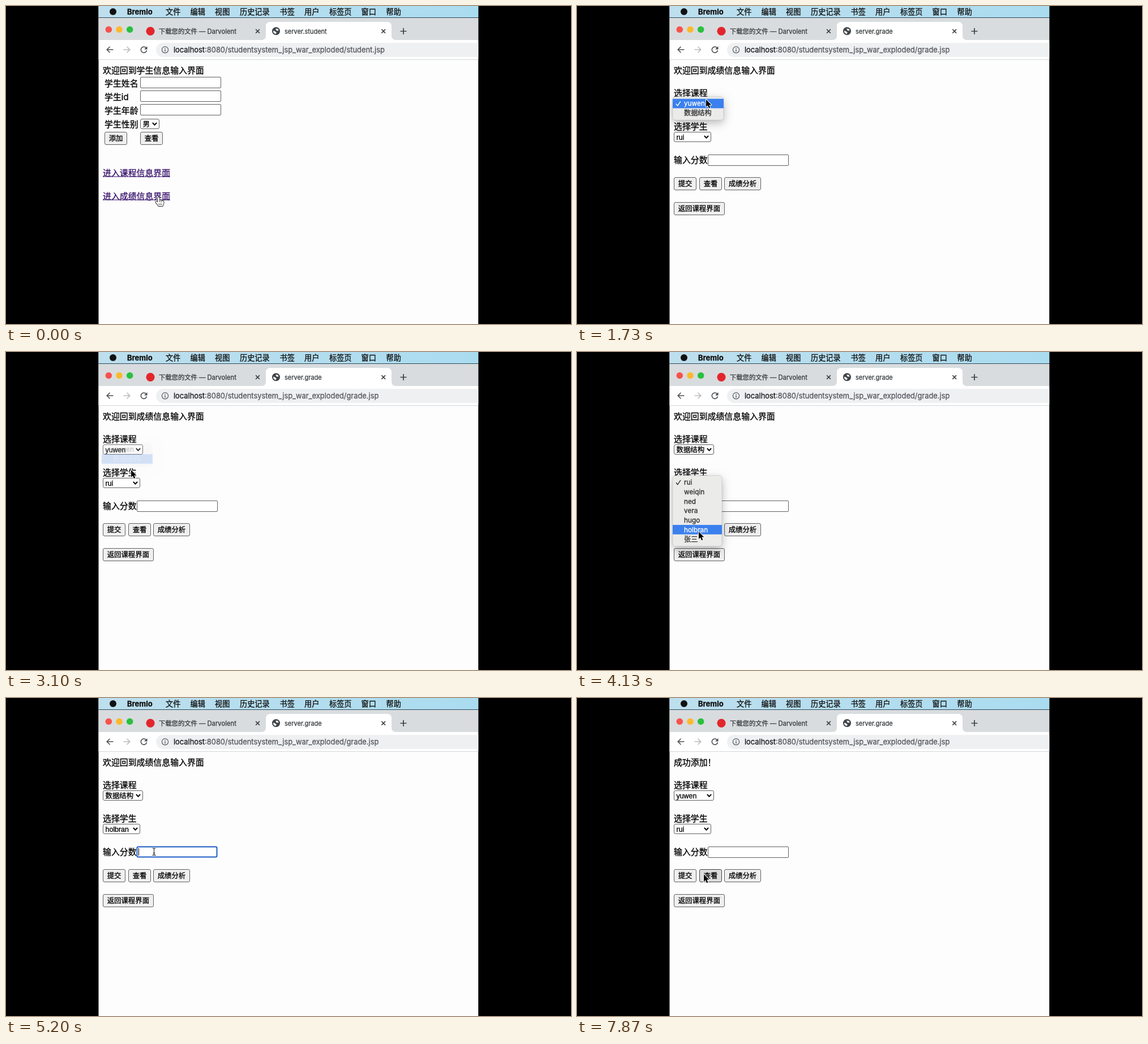
Animation of 998x561 px, one loop 8000 ms. Source, as an HTML page with a canvas:

```html
<!DOCTYPE html>
<html lang="zh-CN">
<head>
<meta charset="utf-8">
<style>
html, body { margin: 0; width: 100%; height: 100%; overflow: hidden; background: #000; }
canvas { display: block; }
</style>
</head>
<body>
<canvas id="stage" width="998" height="561"></canvas>
<script>
const ctx = document.getElementById('stage').getContext('2d');
const LOOP = 8000;
const LEFT = 163.5, RIGHT = 834.5, WIDTH = RIGHT - LEFT;
const UI = 'Inter, "Noto Sans CJK SC", sans-serif';
const CONTROL = '"Liberation Sans", "Noto Sans CJK SC", sans-serif';
const BORDER = '#606060';
const COURSES = ['yuwen', '数据结构'];
const STUDENTS = ['rui', 'weiqin', 'ned', 'vera', 'hugo', 'holbran', '张三'];
const ROW = 16.67;

const PAGE_LOADED = 620, SUBMITTED = 7250, FOCUSED = 5130, TYPED = 5630;
const courseMenu = { items: COURSES, x: 169, y: 160, w: 90, open: 1700, click: 2770, fade: 2940 };
const studentMenu = { items: STUDENTS, x: 169, y: 218, w: 87, open: 3600, click: 4400, fade: 4520 };
const FADE = 200;

// Pointer stops: time, x, y
const path = [
  [0, 269, 337], [700, 269, 337], [1600, 228, 165], [2500, 228, 165],
  [2640, 225, 184], [2800, 225, 184], [3100, 221, 208], [3350, 224, 226],
  [3600, 224, 226], [4130, 215, 317], [4400, 215, 317], [5000, 261, 271],
  [6130, 261, 271], [6170, 260, 306], [6370, 260, 306], [6600, 229, 307],
  [6700, 229, 307], [7000, 191, 309], [7250, 191, 309], [7750, 224, 311], [LOOP, 224, 311]
];

function pointerAt(t) {
  const i = path.findIndex(p => p[0] > t);
  const [t0, x0, y0] = path[i - 1], [t1, x1, y1] = path[i];
  const u = (t - t0) / (t1 - t0), k = u * u * (3 - 2 * u);
  return { x: x0 + (x1 - x0) * k, y: y0 + (y1 - y0) * k };
}

const inside = (p, x, y, w, h) => p.x >= x && p.x <= x + w && p.y >= y && p.y <= y + h;

// The hairline outline gives the slightly heavy look of smoothed screen text
function text(str, x, cy, size = 14.9, color = '#000', face = UI, weight = 400) {
  const y = cy + size * 0.37;
  ctx.font = `${weight} ${size}px ${face}`;
  ctx.fillStyle = ctx.strokeStyle = color;
  ctx.lineWidth = .3;
  ctx.fillText(str, x, y);
  ctx.strokeText(str, x, y);
}

function rect(x, y, w, h, color) {
  ctx.fillStyle = color;
  ctx.fillRect(x, y, w, h);
}

function box(x, y, w, h, radius, fill, stroke, line = 1) {
  ctx.beginPath();
  ctx.roundRect(x, y, w, h, radius);
  if (fill) { ctx.fillStyle = fill; ctx.fill(); }
  if (stroke) { ctx.strokeStyle = stroke; ctx.lineWidth = line; ctx.stroke(); }
}

function disc(x, y, r, color) {
  ctx.beginPath();
  ctx.arc(x, y, r, 0, 7);
  ctx.fillStyle = color;
  ctx.fill();
}

function stroke(d, color, width, x = 0, y = 0) {
  ctx.save();
  ctx.translate(x, y);
  ctx.strokeStyle = color;
  ctx.lineWidth = width;
  ctx.stroke(new Path2D(d));
  ctx.restore();
}

function shape(d, x, y, fill, line, width) {
  const p = new Path2D(d);
  ctx.save();
  ctx.translate(x, y);
  ctx.lineJoin = 'round';
  ctx.lineWidth = width;
  ctx.strokeStyle = line;
  ctx.stroke(p);
  ctx.fillStyle = fill;
  ctx.fill(p);
  ctx.restore();
}

function button(label, x, y, w, pointer) {
  const hover = inside(pointer, x, y, w, 23);
  box(x + .5, y + .5, w - 1, 22, 2.5, hover ? '#dcdcdc' : '#efefef', hover ? '#404040' : BORDER);
  text(label, x + 7.7, y + 11.5, 12.4, '#000', CONTROL);
}

function select(label, x, y, w) {
  box(x + .5, y + .5, w - 1, 17, 2.5, '#fff', BORDER);
  text(label, x + 4.5, y + 9.3, 12.4, '#000', CONTROL);
  stroke('M-3.6 -2L0 1.8L3.6 -2', '#000', 1.9, x + w - 8.5, y + 9);
}

function input(x, y, focused) {
  if (focused) box(x + .5, y + .5, 141, 18, 2, '#fff', '#1c5cc4', 2);
  else box(x + .5, y + .5, 142, 19, 1.5, '#fff', BORDER);
}

function link(label, y) {
  text(label, 171, y, 14.9, '#35106a');
  rect(171, y + 6.5, 119, 1, '#35106a');
}

function drawBrowser(page) {
  const sky = ctx.createLinearGradient(LEFT, 0, RIGHT, 0);
  sky.addColorStop(0, '#bddfee');
  sky.addColorStop(1, '#aadcf0');
  rect(LEFT, 0, WIDTH, 20, sky);
  rect(LEFT, 20, WIDTH, 1, '#2d4a5c');
  disc(189, 10, 6, '#111');
  text('Bremlo', 214, 10.5, 13, '#111', UI, 700);
  [['文件', 282], ['编辑', 325.5], ['视图', 369], ['历史记录', 413], ['书签', 483.5],
   ['用户', 527], ['标签页', 571], ['窗口', 627.5], ['帮助', 671.5]]
    .forEach(([s, x]) => text(s, x, 10.5, 13.2, '#111'));

  rect(LEFT, 21, WIDTH, 39, '#d8dcde');
  ['#f8524c', '#fbb92f', '#2bc03f'].forEach((c, i) => disc(181.3 + i * 18.7, 41.5, 5.8, c));
  disc(255, 44.3, 7.6, '#e2262c');
  text('下载您的文件 — Darvolent', 270, 44.5, 11.3, '#3c4043');

  ctx.fillStyle = '#fff';
  ctx.fill(new Path2D('M451 60Q459 60 459 52V36Q459 28 467 28H673Q681 28 681 36V52Q681 60 689 60Z'));
  disc(477, 44.3, 7, '#3f4448');
  ctx.fillStyle = '#fff';
  ctx.fill(new Path2D('M472 43.5L475 44.5L478 47L476 49.5L472.5 47ZM476 40L480.5 40.5L481.5 43.5L478 43.5Z'));
  text('server.' + page, 492, 44.5, 11, '#3c4043');
  const cross = 'M-3.4 -3.4L3.4 3.4M3.4 -3.4L-3.4 3.4';
  stroke(cross, '#3c4043', 1.5, 444.5, 44.5);
  stroke(cross, '#3c4043', 1.5, 666.7, 44.5);
  stroke('M-5.5 0H5.5M0 -5.5V5.5', '#3c4043', 1.7, 702, 44.5);

  rect(LEFT, 60, WIDTH, 34, '#fff');
  rect(LEFT, 94, WIDTH, 1, '#d4d6d8');
  stroke('M6 0H-5M0 -5.3L-5.3 0L0 5.3', '#4a4e52', 1.6, 183.5, 77);
  stroke('M-6 0H5M0 -5.3L5.3 0L0 5.3', '#b8bbbe', 1.6, 213.5, 77);
  stroke('M4 -3.2A5.2 5.2 0 1 0 5.1 1.2', '#4a4e52', 1.6, 243.5, 77);
  ctx.fillStyle = '#4a4e52';
  ctx.fill(new Path2D('M249.5 71V76.5H244Z'));
  box(265, 65, 600, 25, 12.5, '#eef0f2');
  ctx.beginPath();
  ctx.arc(281, 77.3, 5.6, 0, 7);
  ctx.strokeStyle = '#54585c';
  ctx.lineWidth = 1.2;
  ctx.stroke();
  rect(280.3, 76.5, 1.4, 4, '#54585c');
  rect(280.3, 74, 1.4, 1.4, '#54585c');
  text('localhost', 296, 77, 12.9, '#202124');
  const hostWidth = ctx.measureText('localhost').width;
  text(`:8080/studentsystem_jsp_war_exploded/${page}.jsp`, 296 + hostWidth, 77, 12.9, '#565a5f');
}

function drawStudentPage(pointer) {
  text('欢迎回到学生信息输入界面', 171, 113);
  ['学生姓名', '学生id', '学生年龄', '学生性别'].forEach((s, i) => {
    const y = 136 + i * 24.2;
    text(s, 174, y);
    if (i < 3) input(237, Math.round(y - 11), false);
  });
  select('男', 237, 199, 34);
  button('添加', 174, 222, 40, pointer);
  button('查看', 237, 222, 40, pointer);
  link('进入课程信息界面', 294);
  link('进入成绩信息界面', 335);
}

function drawGradePage(t, pointer) {
  const done = t >= SUBMITTED;
  const course = !done && t >= courseMenu.fade + FADE ? COURSES[1] : COURSES[0];
  const student = !done && t >= studentMenu.fade + FADE ? STUDENTS[5] : STUDENTS[0];
  const focused = t >= FOCUSED && !done;
  text(done ? '成功添加！' : '欢迎回到成绩信息输入界面', 171, 113);
  text('选择课程', 171, 153.7);
  select(course, 171, 163, 71);
  text('选择学生', 171, 212.3);
  select(student, 171, 222, 66);
  text('输入分数', 171, 271);
  input(231, 262, focused);
  if (focused) {
    const typed = t >= TYPED;
    if (typed) text('0', 234, 272, 12.4, '#000', CONTROL);
    const caretOn = Math.floor((t - (typed ? TYPED : FOCUSED)) / 500) % 2 === 0;
    if (caretOn) rect(typed ? 241 : 234, 265, 1, 13, '#000');
  }
  button('提交', 171, 302, 40, pointer);
  button('查看', 216, 302, 40, pointer);
  button('成绩分析', 260, 302, 65, pointer);
  button('返回课程界面', 171, 346, 90, pointer);
}

function drawMenu({ items, x, y, w, open, click, fade }, t) {
  if (t < open || t >= fade + FADE) return;
  const top = y + 3.7, h = items.length * ROW + 8;
  const hovered = Math.floor((pointerAt(Math.min(t, click)).y - top) / ROW);
  const alpha = Math.min(1, 1 - (t - fade) / FADE);
  ctx.save();
  ctx.globalAlpha = alpha;
  ctx.save();
  ctx.shadowColor = `rgba(0,0,0,${.28 * alpha})`;
  ctx.shadowBlur = 16;
  ctx.shadowOffsetY = 5;
  box(x, y, w, h, 5, '#ebebea');
  ctx.restore();
  box(x, y, w, h, 5, null, `rgba(0,0,0,${.16 * alpha})`, .7);
  items.forEach((item, i) => {
    const cy = top + (i + .5) * ROW, active = i === hovered;
    const color = active ? '#fff' : '#303030';
    if (active) rect(x, cy - ROW / 2, w, ROW, '#3a80ee');
    if (i === 0) stroke('M-4 .5L-1.3 3.8L4 -4', color, 1.4, x + 10, cy);
    text(item, x + 20, cy, /\w/.test(item) ? 11.8 : 12.2, color);
  });
  ctx.restore();
}

function drawPointer(t, { x, y }) {
  if (t < PAGE_LOADED) {
    shape('M0 1.5Q1.5 -1 3 1.5V6Q5 4.8 6 6.4Q8 5.6 8.6 7.2Q11 7 10.6 10Q10.5 13 8.5 16H1.5Q0 13 -3.5 9.5Q-4 7.2 -1.7 8L0 9.5Z',
      x - 1, y, '#fff', '#222', 1.8);
    stroke('M3 6V9M6 7V9.5M2.2 11.5V14M4.6 11.5V14M7 11.5V14', '#222', .9, x - 1, y);
  } else if (inside({ x, y }, 231, 262, 142, 19) && t > studentMenu.fade) {
    if (t >= TYPED && t < 6130) return;
    const beam = 'M-3 -6.5Q0 -6.5 0 -4.5V4.5Q0 6.5 -3 6.5M3 -6.5Q0 -6.5 0 -4.5M0 4.5Q0 6.5 3 6.5M-1.6 2.5H1.6';
    stroke(beam, '#fff', 2.4, x + .5, y);
    stroke(beam, '#222', 1.1, x + .5, y);
  } else {
    shape('M0 0V13L3 10.3L5.1 15.3L7.4 14.3L5.3 9.5H9.4Z', x, y, '#000', '#fff', 1.8);
  }
}

function draw(t) {
  const pointer = pointerAt(t);
  const graded = t >= PAGE_LOADED;
  rect(0, 0, 998, 561, '#000');
  rect(LEFT, 0, WIDTH, 561, '#fdfdfd');
  drawBrowser(graded ? 'grade' : 'student');
  if (graded) drawGradePage(t, pointer);
  else drawStudentPage(pointer);
  drawMenu(courseMenu, t);
  drawMenu(studentMenu, t);
  drawPointer(t, pointer);
  rect(RIGHT, 0, 998 - RIGHT, 561, '#000');
}

function tick() {
  draw(performance.now() % LOOP);
  requestAnimationFrame(tick);
}
tick();
</script>
</body>
</html>
```
